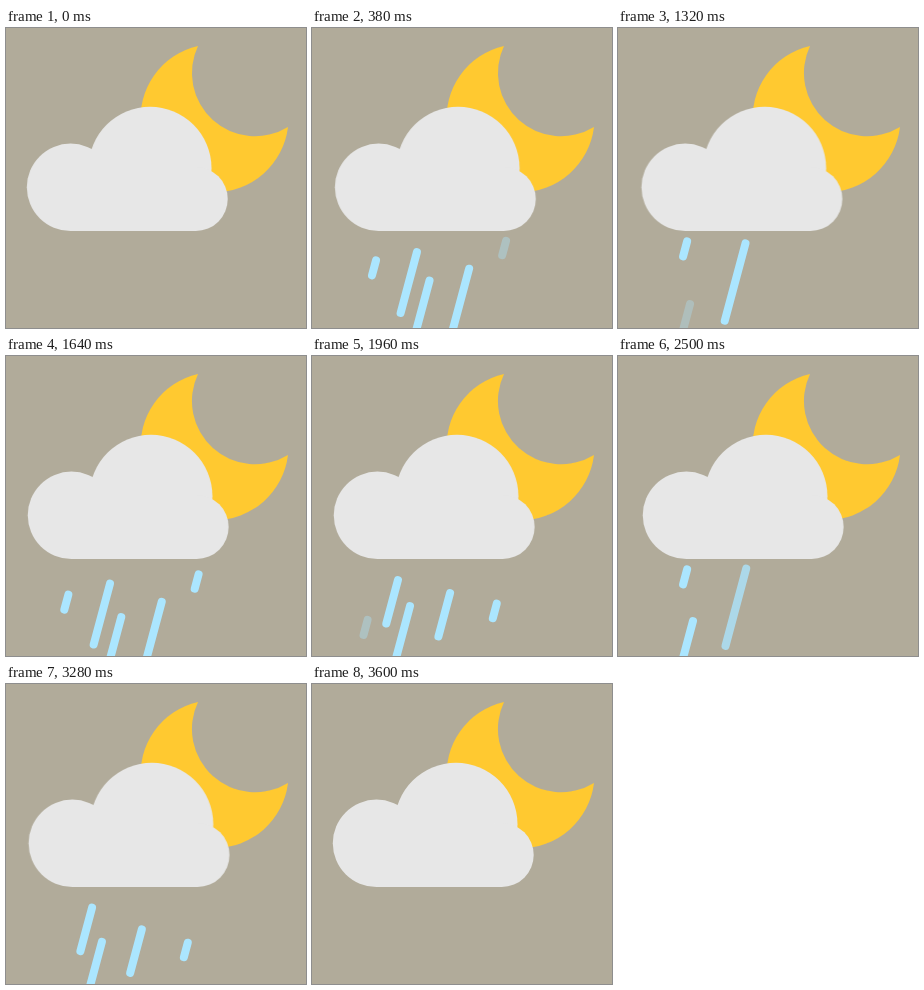
These frames come from a looping animation (300 by 300 pixels, 3.62 s). An HTML page without scripts:

```html
<!DOCTYPE html>
<html lang="en">
<head>
<meta charset="utf-8">
<title>Night rain</title>
<style>
  /* Milliseconds since the start of the loop */
  @property --t {
    syntax: "<number>";
    inherits: true;
    initial-value: 0;
  }

  html, body {
    margin: 0;
    width: 100%;
    height: 100%;
    overflow: hidden;
    background: #b1ab9a;
  }

  svg {
    display: block;
    width: 100%;
    height: 100%;
    animation: clock 3620ms linear infinite;
  }

  .moon { fill: #ffc930; }

  .cloud {
    fill: #e7e7e7;
    animation: drift 3620ms linear infinite;
  }

  .rain {
    animation: shower 3620ms step-end infinite;
  }

  /* --x, --y: start; --speed: px per ms; --start, --life, --every: ms */
  .drop {
    --age: calc(var(--t) - var(--start) - var(--pass) * var(--every));
    fill: none;
    stroke: #abe6ff;
    stroke-width: 8;
    stroke-linecap: round;
    opacity: min(var(--age) / 50, (var(--life) - var(--age)) / 50);
    transform:
      translate(calc(var(--x) * 1px), 200px)
      rotate(15deg)
      translateY(calc((var(--y) - 200 + var(--speed) * var(--age)) * 1.035px));
  }

  @keyframes clock {
    from { --t: 0; }
    to { --t: 3620; }
  }

  @keyframes drift {
    0%, 49.72%, 99.45%, 100% { transform: translateX(0); }
    24.86%, 74.59% { transform: translateX(5px); }
  }

  @keyframes shower {
    0% { visibility: visible; }
    99.4%, 100% { visibility: hidden; }
  }
</style>
</head>
<body>
<svg viewBox="0 0 300 300">
  <defs>
    <g id="drops">
      <path class="drop" d="M0 0v15.5" style="--x:72.7; --y:207; --speed:.079; --start:60; --life:740; --every:1180"/>
      <path class="drop" d="M0 0v45" style="--x:92.4; --y:216.4; --speed:.076; --start:535; --life:802; --every:1325"/>
      <path class="drop" d="M0 0v63" style="--x:111.4; --y:210; --speed:.0704; --start:180; --life:800; --every:1210"/>
      <path class="drop" d="M0 0v80" style="--x:131.6; --y:207; --speed:.143; --start:62; --life:553; --every:1200"/>
      <path class="drop" d="M0 0v45" style="--x:148; --y:224; --speed:.07; --start:575; --life:560; --every:1200"/>
      <path class="drop" d="M0 0v63" style="--x:168; --y:220; --speed:.086; --start:140; --life:560; --every:1200"/>
      <path class="drop" d="M0 0v15" style="--x:197.5; --y:211; --speed:.092; --start:362; --life:700; --every:1200"/>
    </g>
  </defs>

  <path class="moon" d="M192 18A74 74 0 1 0 282 99A63.2 63.2 0 0 1 192 18Z"/>

  <g class="rain">
    <use href="#drops" style="--pass:0"/>
    <use href="#drops" style="--pass:1"/>
    <use href="#drops" style="--pass:2"/>
  </g>

  <g class="cloud">
    <circle cx="64.5" cy="159.3" r="43.7"/>
    <circle cx="144" cy="140.3" r="61.5"/>
    <circle cx="189.7" cy="171" r="32"/>
    <path d="M64 140H190V203H64Z"/>
  </g>
</svg>
</body>
</html>
```
